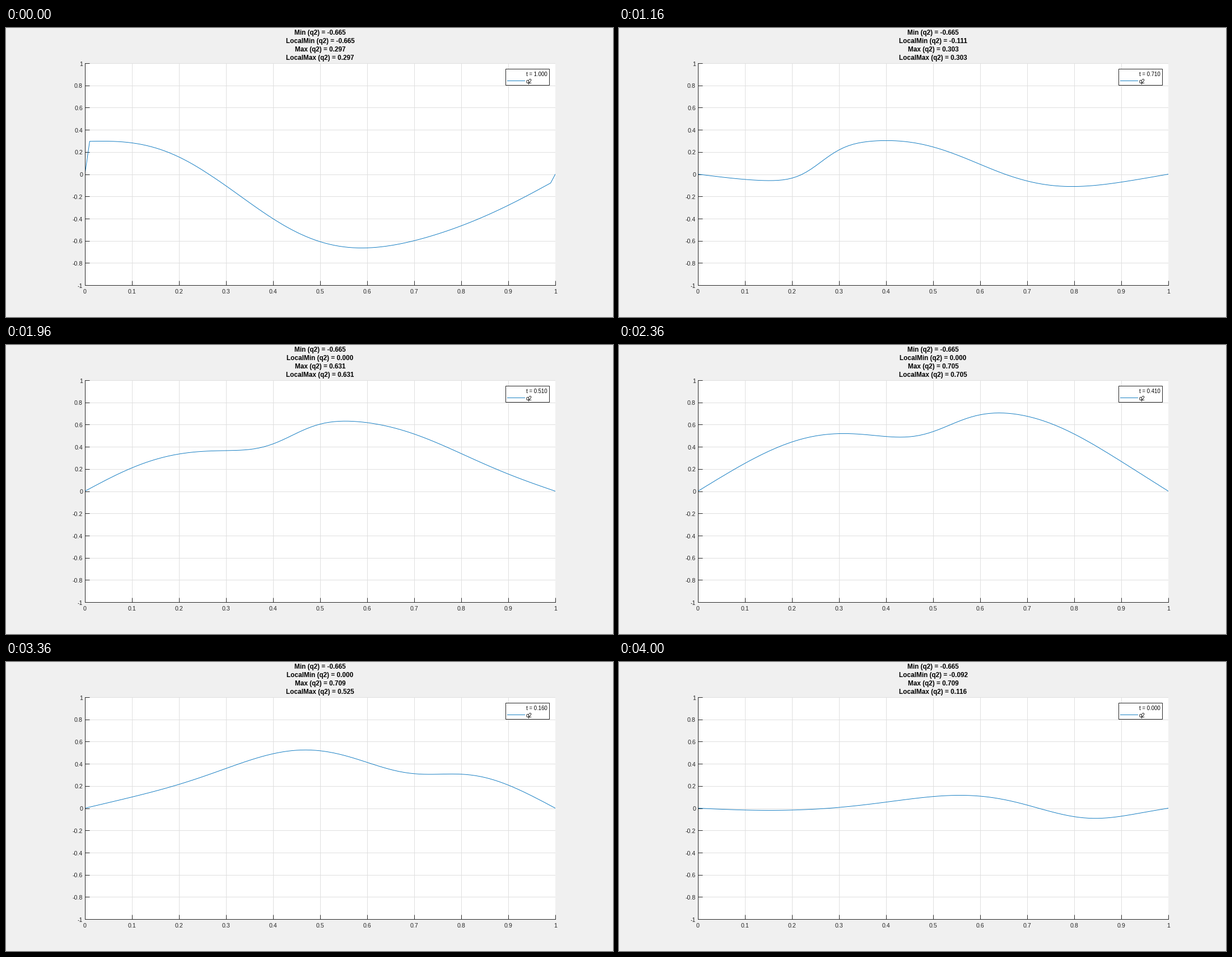
A matplotlib script for the animation above (4.04 s loop, 1084 by 517 pixels).

```python
import math

import matplotlib
import numpy as np

matplotlib.rcParams["toolbar"] = "None"
import matplotlib.pyplot as plt
from matplotlib.animation import FuncAnimation
from matplotlib.patches import Rectangle

W, H, DPI = 1084, 517, 100
FRAMES, INTERVAL = 101, 40
LEFT, RIGHT, TOP, BOTTOM = 141, 981, 63, 460
BLUE, DARK, GRID, BACK = "#0072bd", "#262626", "#dfdfdf", "#f0f0f0"
LOWEST, HIGHEST = -0.665, 0.709

erf = np.vectorize(math.erf)


def ring(s, size, decay, freq, phase=0.0):
    """Damped oscillation."""
    return size * math.exp(-decay * s) * math.cos(freq * s + phase)


def front(x, s):
    """Unit jump leaving x = 0, blurring as it travels, zero at both ends."""
    pos, width = 0.895 * s, 0.08 * math.sqrt(s) + 1e-6

    def edge(p):
        return 0.5 + 0.5 * erf(p / (width * math.sqrt(2)))

    return edge(x - pos) - edge(-x - pos) + edge(x - 2 + pos) - x


def wave(x, s):
    """Standing waves plus a travelling front, s = 1 - t."""
    modes = (ring(s, 0.72, 0, 4.02, -2.742) + ring(s, 0.038, 6, 16),
             ring(s, 0.30, 0, 1, 0.885) + ring(s, 0.016, -1, 6.2, 0.64),
             ring(s, 0.098, 0.35, 10.3),
             ring(s, 0.05, 0.6, 10.9, 1.1),
             ring(s, 0.017, 0, 12.6, -4.41))
    u = sum(a * np.sin(k * math.pi * x) for k, a in enumerate(modes, 1))
    u += 0.288 * front(x, s)
    u -= 0.057 * math.exp(-s / 0.04) * front(1 - x, s)
    u[[0, -1]] = 0
    return u


def px(size):
    return size * 72 / DPI


def label(x, y, text, size, **kw):
    return fig.text(x / W, 1 - y / H, text, fontsize=px(size),
                    va="baseline", **kw)


def number(v):
    return f"{round(float(v), 3) + 0.0:.3f}"


x = np.linspace(0, 1, 101)
waves = np.array([wave(x, i / (FRAMES - 1)) for i in range(FRAMES)])
waves *= np.where(waves > 0, HIGHEST / waves.max(), LOWEST / waves.min())
lows, highs = waves.min(axis=1), waves.max(axis=1)
stats = {"Min": np.minimum.accumulate(lows), "LocalMin": lows,
         "Max": np.maximum.accumulate(highs), "LocalMax": highs}

plt.rcParams["font.family"] = "Liberation Sans"
fig = plt.figure(figsize=(W / DPI, H / DPI), dpi=DPI, facecolor=BACK)
ax = fig.add_axes([LEFT / W, 1 - BOTTOM / H,
                   (RIGHT - LEFT) / W, (BOTTOM - TOP) / H])
ax.set(xlim=(0, 1), ylim=(-1, 1), facecolor="white")
ax.set_xticks(np.arange(11) / 10)
ax.set_yticks(np.arange(-5, 6) / 5)
ax.set_axisbelow(True)
ax.grid(color=GRID, linewidth=px(1))
ax.tick_params(direction="in", length=px(8), width=px(1), color=DARK,
               labelbottom=False, labelleft=False)
for side in ("top", "right"):
    ax.spines[side].set_visible(False)
for side in ("left", "bottom"):
    ax.spines[side].set(color=DARK, linewidth=px(1))

for i in range(11):
    label(LEFT + (RIGHT - LEFT) * i / 10, 475, f"{i / 10:g}", 10.67,
          ha="center", color=DARK)
    label(137, BOTTOM + 4.6 - (BOTTOM - TOP) * i / 10, f"{(i - 5) / 5:g}",
          10.67, ha="right", color=DARK)

curve, = ax.plot([], [], color=BLUE, linewidth=px(0.9))
titles = [label(561, 12 + 15 * i, "", 11.73, ha="center", weight="bold",
                color="black") for i in range(len(stats))]

# Legend in pixel coordinates
key = fig.add_axes([0, 0, 1, 1])
key.set(xlim=(0, W), ylim=(H, 0))
key.axis("off")
key.add_patch(Rectangle((892.5, 73.5), 78, 29, facecolor="white",
                        edgecolor=DARK, linewidth=px(1), snap=False))
key.plot([895, 927], [94.5, 94.5], color=BLUE, linewidth=px(0.9),
         solid_capstyle="butt", snap=False)
clock = label(929, 86, "", 9.6, color="black")
label(929, 99, "q2", 9.6, color="black")


def draw(i):
    curve.set_data(x, waves[i])
    for title, (name, values) in zip(titles, stats.items()):
        title.set_text(f"{name} (q2) = {number(values[i])}")
    clock.set_text(f"t = {1 - i / (FRAMES - 1):.3f}")
    return [curve, clock, *titles]


anim = FuncAnimation(fig, draw, frames=FRAMES, interval=INTERVAL,
                     init_func=lambda: draw(0), repeat=True, repeat_delay=0)
plt.show()
```
